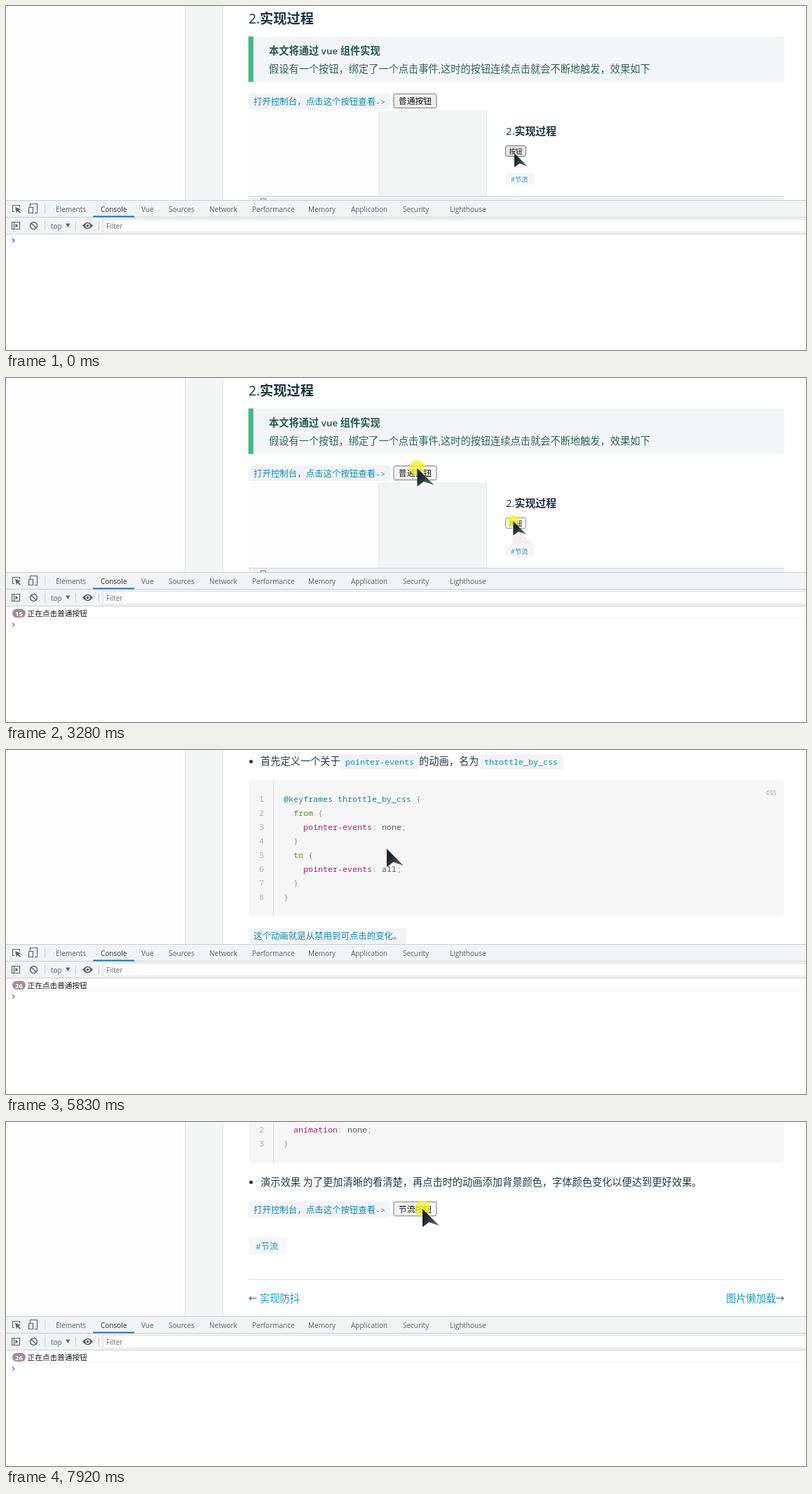
An HTML page that plays this animation: 1141 by 491 pixels, repeating every 7990 ms.

```html
<!DOCTYPE html>
<html lang="zh">
<head>
<meta charset="utf-8">
<style>
html, body { margin: 0; width: 100%; height: 100%; overflow: hidden; background: #fff; }
svg { display: block; }
text { white-space: pre; font-family: "Open Sans", "Noto Sans CJK SC", "Noto Sans CJK", sans-serif; }
.latin { font-size: .94em; }
.mono, .mono .latin { font-family: "Noto Sans Mono", "Noto Sans CJK SC", monospace; font-size: 11.67px; }
.bold { font-weight: 700; }
.bold .latin { font-weight: 600; }
</style>
</head>
<body>
<svg id="stage" width="1141" height="491" viewBox="0 0 1141 491"></svg>
<script>
const LOOP = 7990, INK = '#1c3a48', GREEN = '#2a664f', BLUE = '#0a8ab8', LINK = '#149bc9';
const ARROW = 'M0 0L24 24 9.500 19 0 26Z';

// Markup helpers
const rect = (x, y, w, h, fill, more = '') => `<rect x="${x}" y="${y}" width="${w}" height="${h}" fill="${fill}" ${more}/>`;
const line = (d, stroke, width = 1) => `<path d="${d}" fill="none" stroke="${stroke}" stroke-width="${width}"/>`;
const text = (x, y, s, fill = INK, size = 14.22, more = '') =>
  `<text x="${x}" y="${y}" fill="${fill}" font-size="${size}" ${more}>${s.replace(/[!-~]+/g, '<tspan class="latin">$&</tspan>')}</text>`;
const bold = (x, y, s, fill, size) => text(x, y, s, fill, size, 'class="bold"');
const mono = (x, y, s, fill = BLUE) => `<text class="mono" x="${x}" y="${y}" fill="${fill}">${s}</text>`;
const ui = (x, y, s, fill = '#5a5f64') => `<text x="${x}" y="${y}" fill="${fill}" font-size="10">${s}</text>`;
const chip = (x, y, w, fill = '#f2f3f4') => rect(x, y, w, 22, fill, 'rx="3"');
const group = (y, ...parts) => `<g transform="translate(0 ${y})">${parts.join('')}</g>`;
const bullet = (y, s) => `<circle cx="349.5" cy="${y}" r="2.5" fill="${INK}"/>` + text(363, y + 5, s);
const tip = (y, h, title) => rect(346, y, 764, h, '#f3f5f7') + rect(345.7, y, 7.1, h, '#42b983') + bold(375, y + 25.5, title, '#1f5a45');
const heading = (x, y, s, size) =>
  `<text x="${x}" y="${y}" fill="#16323c" font-size="${size}"><tspan font-weight="500">2.</tspan><tspan class="bold">${s}</tspan></text>`;
const button = (id, x, y, w, h, label, size) =>
  rect(x + .5, y + .5, w - 1, h - 1, '#efefef', `id="${id}" rx="2.2" stroke="#767676" stroke-width="${size / 11.85}"`) +
  text(x + w / 2, y + h / 2 + size * .38, label, '#111', size, 'text-anchor="middle"');
const cursor = id => `<g id="${id}"><circle r="11" cy="-.5" fill="#f5f52a" opacity=".8"/><path d="${ARROW}" fill="url(#dark)"/></g>`;

function highlight(s) {
  const colors = ['#1580aa', '#5a8f1c', '#a02668', '#999'];
  return s.replace(/(@.*(?= \{))|([\w.:-]+(?= \{))|([\w-]+(?=:))|([{}:;])/g,
    (m, ...g) => `<tspan fill="${colors[g.slice(0, 4).findIndex(Boolean)]}">${m}</tspan>`);
}
function code(y, rows) {
  return rect(346, y, 764, 35 + rows.length * 20, '#f6f6f6', 'rx="5"') +
    line(`M381.500 ${y}v${35 + rows.length * 20}`, '#d9d9d9') +
    text(1084, y + 22, 'css', '#aaa', 11) +
    rows.map((s, i) => mono(361, y + 32 + i * 20, i + 1, '#b0b0b0') + mono(396, y + 32 + i * 20, highlight(s), '#555')).join('');
}
const prompt = y => chip(346, y, 202) + text(353, y + 16, '打开控制台，点击这个按钮查看', BLUE, 12.44) + mono(527, y + 15.5, '->');

const recording = [
  rect(346, 149, 764, 330, '#fff'), rect(346, 149, 185, 122, '#fdfdfd'), rect(531, 149, 154, 122, '#f3f5f5'),
  line('M531.500 149v122M685.500 149v122', '#e9ebeb'),
  heading(713, 183.500, '实现过程', 14.9),
  button('innerButton', 712, 199, 30, 16, '按钮', 9.4),
  `<path id="ghost" d="${ARROW}" fill="#f0f0f0" transform="translate(722 210) scale(1.5 1.35)"/>`,
  rect(713, 238, 41, 17, '#f4f6f6'), text(720, 250.500, '#节流', '#3a8fb7', 9.3),
  rect(346, 271, 764, 17, '#f1f3f4'), line('M346 271.500h764M346 288.500h764', '#cfd1d4'),
  line('M363.500 280v-5h7v5', '#777'), cursor('innerCursor')
];

const page = [
  heading(346, 25, '实现过程', 19.2),
  tip(43.5, 65, '本文将通过 vue 组件实现'),
  text(375, 95, '假设有一个按钮，绑定了一个点击事件,这时的按钮连续点击就会不断地触发，效果如下', GREEN),
  prompt(125), button('plainButton', 552.5, 125, 62, 21, '普通按钮', 11.85),
  ...recording,
  group(500,
    bullet(16.5, '首先定义一个关于'), chip(477, 6, 112), mono(484, 21, 'pointer-events'),
    text(589, 21.5, '的动画，名为'), chip(675, 6, 120), mono(682, 21, 'throttle_by_css'),
    code(42.5, ['@keyframes throttle_by_css {', '  from {', '    pointer-events: none;', '  }', '  to {', '    pointer-events: all;', '  }', '}']),
    chip(346, 254.5, 225), text(353, 270, '这个动画就是从禁用到可点击的变化。', BLUE, 12.44)),
  group(840,
    bullet(-30, '然后给按钮绑定这个动画'),
    code(-2, ['.btn_area {', '  animation: throttle_by_css 2s forwards;', '}']),
    tip(107.5, 115, '说明'),
    text(375, 159.5, '通过上述动画绑定，按钮再点击时 pointer-events 在 0~2 秒内的值都是 none，一旦到达 2 秒，就立刻变成了 all，', GREEN),
    text(375, 184, '由于是', GREEN), chip(421, 168, 70, '#e8ebed'), mono(428, 183.5, 'forwards'), text(492, 184, '，会一直保持 all 的状态', GREEN),
    text(375, 209, '如果不怎么了解动画相关问题，可以', GREEN), text(602, 209, '点此', LINK),
    line('M636 200.500h-4v8h8v-4M638 199.500h4v4M642 199.500l-5 5', '#aaa'),
    text(648, 209, '查看更多动画相关介绍。', GREEN),
    tip(237, 68, '最后也是最重要的一点'),
    text(375, 290, '点击的时候需要把动画取消掉，', GREEN), chip(602, 273, 218, '#e8ebed'), mono(609, 289, 'animation: none'),
    bullet(334, '点击时取消动画')),
  group(1234,
    code(-37, ['.btn_area:active {', '  animation: none;', '}']),
    bullet(86, '演示效果 为了更加清晰的看清楚，再点击时的动画添加背景颜色，字体颜色变化以便达到更好效果。'),
    prompt(114), button('throttleButton', 552.5, 113.5, 62, 21, '节流按钮', 11.85),
    rect(346, 165, 53, 24, '#f4f6f7'), text(356, 182, '#节流', LINK, 12.4),
    line('M346 224.500h764', '#dcdfe1'),
    text(346, 257, '←', INK, 12), text(362, 257, '实现防抖', LINK),
    text(1027, 257, '图片懒加载', LINK), text(1098, 257, '→', INK, 12))
];

const tabs = { Elements: 71, Console: 135, Vue: 193, Sources: 232, Network: 290, Performance: 351, Memory: 431, Application: 492, Security: 566, Lighthouse: 633 };
const devtools = [
  rect(0, 277, 1141, 214, '#fff'), rect(0, 277, 1141, 48, '#f1f3f4'),
  line('M0 277.500h1141M0 301.500h1141M0 325.500h1141', '#cbced2'),
  line('M55.500 283v13M55.500 307v13M99.500 307v13M132.500 307v13', '#cdcfd2'),
  ...Object.entries(tabs).map(([name, x]) => ui(x, 293.500, name, name === 'Console' ? '#2d3033' : undefined)),
  rect(124, 299.500, 59, 2, '#1a73c8'),
  line('M12 293.500h-2.500v-9h10v3M34.500 287v-4.500h10v13h-4', '#5f6368', 1.2),
  line('M32.500 287.500h6v8h-6z', '#5f6368', 1.2),
  '<path d="M13 287l8 3-3 1.500 3 3-1.500 1-3-3-1.500 3z" fill="#5f6368"/>',
  line('M8.500 308.500h11v10h-11zM11.500 308v11', '#5f6368', 1.2), '<path d="M13.500 310.500l4 3-4 3z" fill="#5f6368"/>',
  '<circle cx="39.5" cy="313.5" r="5" fill="none" stroke="#5f6368" stroke-width="1.5"/>', line('M36 310l7 7', '#5f6368', 1.500),
  ui(64, 317.5, 'top'), '<path d="M85 310.500h6.500l-3.250 5.500z" fill="#5f6368"/>',
  '<path d="M109 313.500q7.500-9.500 15 0q-7.500 9.500-15 0z" fill="#5f6368"/><circle cx="116.500" cy="313.500" r="2.500" fill="#5f6368" stroke="#f1f3f4" stroke-width="1.300"/>',
  rect(138.5, 304.5, 1010, 18, '#fff', 'stroke="#dfe1e4"'), ui(143, 318, 'Filter', '#666'),
  '<g id="log">', rect(9, 329.5, 13, 12.5, '#a08c99', 'id="badge" rx="6.25"'),
  '<text id="count" y="339.5" font-size="9.5" fill="#fff" text-anchor="middle" class="bold"></text>',
  `<g id="message">${text(0, 339.5, '正在点击普通按钮', '#111', 10.67)}</g>`, line('M0 343.500h1141', '#f0f0f0'), '</g>',
  '<path id="caret" d="M-1.500-2.700l3 2.700-3 2.700" fill="none" stroke-width="1.400"/>'
];

const stage = document.getElementById('stage');
stage.innerHTML = [
  '<defs><linearGradient id="dark" x1="0" x2="1" y2=".7"><stop offset=".3" stop-color="#172428"/><stop offset="1" stop-color="#5c6468"/></linearGradient></defs>',
  rect(0, 0, 1141, 277, '#fff'), rect(0, 0, 255, 277, '#fdfdfd'), rect(256, 0, 53, 277, '#f3f5f5'),
  line('M255.500 0v277M309.500 0v277', '#e2e4e4'),
  `<g id="page">${page.join('')}</g>`, ...devtools, cursor('mainCursor')
].join('');
const el = Object.fromEntries([...stage.querySelectorAll('[id]')].map(e => [e.id, e]));

// Keyframes are [time, ...values], eased between neighbours
function track(keys, t) {
  const i = keys.findIndex(k => k[0] > t);
  if (i < 1) return (i ? keys.at(-1) : keys[0]).slice(1);
  const [a, b] = [keys[i - 1], keys[i]], u = (t - a[0]) / (b[0] - a[0]), e = u * u * (3 - 2 * u);
  return a.slice(1).map((v, j) => v + (b[j + 1] - v) * e);
}
const scrollKeys = [[5090, 0], [5630, 480], [5780, 480], [5830, 500], [6120, 650], [6270, 650], [6500, 820], [6650, 820], [6700, 840], [7040, 990], [7200, 990], [7520, 1234]];
const mainKeys = [[50, 1049, 495], [750, 588, 129], [1610, 588, 129], [2420, 587, 129], [4090, 586, 128.5], [5010, 586, 128.5], [5150, 543, 141], [7400, 543, 141], [7750, 594, 124]];
const innerKeys = [[1300, 725, 210], [1560, 736, 224], [2360, 803, 277], [2420, 800, 264], [2900, 723.5, 204.5]];

const show = (node, on) => node.setAttribute('visibility', on ? 'inherit' : 'hidden');
function paintButton(node, hover, pressed) {
  node.setAttribute('fill', pressed ? '#f5f5f5' : hover ? '#e5e5e5' : '#efefef');
  node.setAttribute('stroke', hover && !pressed ? '#4f4f4f' : '#767676');
}
function place(node, [x, y], size, pressed) {
  node.setAttribute('transform', `translate(${x} ${y}) scale(${size})`);
  show(node.firstChild, pressed);
}

function draw(t) {
  const clicks = (t - 915) / 163;
  const count = Math.max(0, Math.min(26, Math.floor(clicks) + 1));
  const pressing = t >= 850 && clicks < 25 && clicks - Math.floor(clicks) > .4;
  const lastPress = t >= 7820;

  el.page.setAttribute('transform', `translate(0 ${-track(scrollKeys, t)[0]})`);
  place(el.mainCursor, track(mainKeys, t), 1, pressing || lastPress);
  place(el.innerCursor, track(innerKeys, t), .78, pressing && t > 2950);
  show(el.innerCursor, t < 1580 || t > 2380);
  show(el.ghost, t >= 1680 && t < 3300);
  paintButton(el.plainButton, t > 700 && t < 5060, pressing);
  paintButton(el.innerButton, t < 1300 || t > 2880, pressing && t > 2950);
  paintButton(el.throttleButton, t > 7650, lastPress);

  const wide = count > 9;
  show(el.log, count > 0);
  el.count.textContent = count;
  el.count.setAttribute('x', wide ? 18.5 : 15.5);
  el.badge.setAttribute('width', wide ? 19 : 13);
  el.message.setAttribute('transform', `translate(${wide ? 30.5 : 25.5} 0)`);
  el.caret.setAttribute('transform', `translate(10.500 ${count ? 352 : 334.5})`);
  el.caret.setAttribute('stroke', t < 850 ? '#2a78d0' : '#808890');
}
function tick() {
  draw(performance.now() % LOOP);
  requestAnimationFrame(tick);
}
tick();
</script>
</body>
</html>
```
